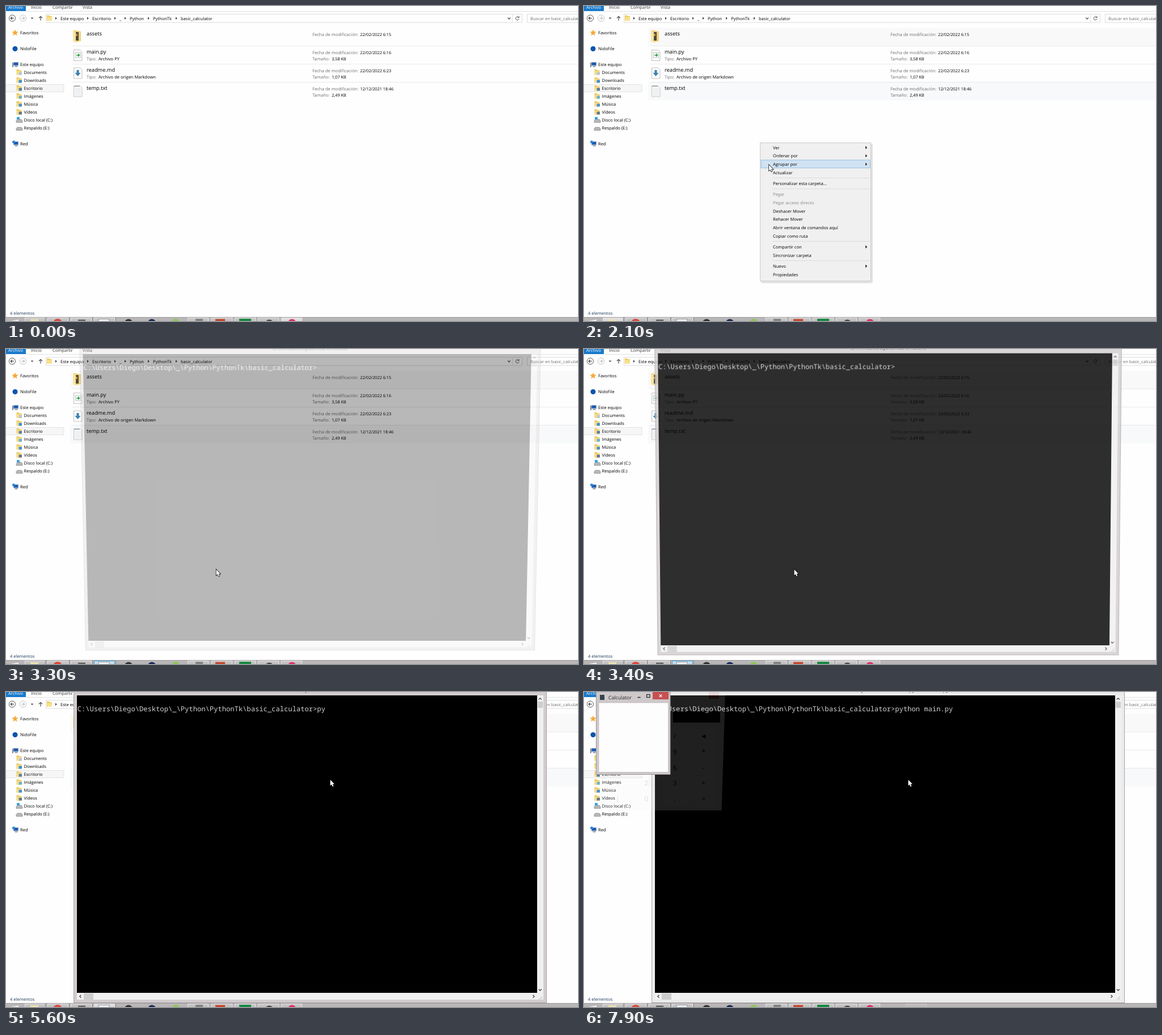
Recreate the animation shown at these times as an HTML page. Size 1008x556 px, loop 8 s.

```html
<!DOCTYPE html>
<html lang="es">
<head>
<meta charset="utf-8">
<title>Console demo</title>
<style>
html, body { margin: 0; width: 100%; height: 100%; overflow: hidden; background: #fefefe; }
svg { position: absolute; left: 0; top: 0; width: 1008px; height: 556px; overflow: visible; }
text { font-family: "Open Sans", sans-serif; white-space: pre; text-rendering: geometricPrecision; }
.mono { font-family: "Noto Sans Mono", monospace; }
#cmd { transform-origin: 535px 82px; }
</style>
</head>
<body>
<svg id="desk"></svg>
<svg id="cmd"></svg>
<svg id="top"></svg>
<script>
const $ = id => document.getElementById(id);
const rect = (x, y, w, h, fill, more = '') => `<rect x="${x}" y="${y}" width="${w}" height="${h}" fill="${fill}" ${more}/>`;
const text = (x, y, s, fill = '#000', size = 7.55, more = '') =>
  `<text x="${x}" y="${y}" fill="${fill}" font-size="${size}" ${more}>${s}</text>`;
const shape = (d, fill, more = '') => `<path d="${d}" fill="${fill}" ${more}/>`;
const line = (d, color, w = 1) => `<path d="${d}" fill="none" stroke="${color}" stroke-width="${w}"/>`;
const disc = (x, y, r, fill, more = '') => `<circle cx="${x}" cy="${y}" r="${r}" fill="${fill}" ${more}/>`;
const group = (id, body) => `<g id="${id}">${body}</g>`;
const show = (id, on) => $(id).setAttribute('opacity', +on);

const folder = (x, y, mark) => shape(`M${x} ${y}h4l1 1.5h4v8h-9z`, '#edcb62') +
  rect(x + 1, y + 3, 8, 6.5, '#f9e08c') + (mark ? rect(x + 4, y + 4.5, 5.5, 5, mark) : '');
const page = y => shape(`M119.5 ${y}h11l3.5 3.5v15.5h-14.5z`, '#fbfbfb', 'stroke="#b4b4b4" stroke-width=".8"');
const screen = (x, y) => rect(x, y, 9, 6.5, '#8fa3b5') + rect(x + 1, y + 1, 7, 4.5, '#1c58b8') +
  rect(x + 2.5, y + 7, 5, 1.5, '#7b8794');

function explorer() {
  let s = rect(0, 0, 1008, 556, '#fefefe');
  s += rect(0, 0, 35, 9, '#1979ca') + line('M35 9.5H1008', '#e0e2e4');
  s += text(4, 5, 'Archivo', '#fff');
  [[44, 'Inicio'], [82, 'Compartir'], [135, 'Vista']].forEach(([x, n]) => s += text(x, 5, n, '#333'));

  // address bar
  s += disc(11, 21.5, 5.6, '#fff', 'stroke="#555"') + line('M14 21.5H8.3M10.8 19L8.3 21.5L10.8 24', '#444', 1.2);
  s += disc(30, 21.5, 5.6, '#fff', 'stroke="#c4c4c4"') + line('M27 21.5H32.7M30.2 19L32.7 21.5L30.2 24', '#c0c0c0', 1.2);
  s += shape('M43.5 20.5h5l-2.5 2.8z', '#555') + line('M61 25.5V18.5M58 21.3L61 18.3L64 21.3', '#555', 1.3);
  s += rect(70.5, 14.5, 839, 14.5, '#fff', 'stroke="#dcdcdc"') + folder(72, 16.5);
  [[96, 'Este equipo'], [152, 'Escritorio'], [200, '_'], [218, 'Python'], [259, 'PythonTk'], [308, 'basic_calculator']]
    .forEach(([x, n]) => s += shape(`M${x - 9} 19.3l2.7 2.4l-2.7 2.4z`, '#333') + text(x, 24.5, n));
  s += line('M884.3 20.5l2.3 2.5l2.3 -2.5', '#555', 1.2) + line('M892.5 15V29', '#e4e4e4');
  s += line('M903.5 19.8A3 3 0 1 0 904.2 22.5M904 18v2.5h-2.5', '#555');
  s += rect(918.5, 14.5, 100, 14.5, '#fff', 'stroke="#dcdcdc"') + text(924, 24.5, 'Buscar en basic_calculator', '#6d6d6d');

  // navigation pane
  s += rect(-1, 138.5, 103, 13, '#f6f6f6', 'stroke="#d9d9d9" stroke-dasharray="1 .5"');
  s += shape('M16 41.5l1.6 3.8l4.1 .3l-3.1 2.7l1 4l-3.6 -2.2l-3.6 2.2l1 -4l-3.1 -2.7l4.1 -.3z', '#f5a93b');
  s += disc(16, 75.5, 4.5, '#0b54ae') + screen(13, 99) + rect(11, 100, 2, 8, '#7d8a97');
  s += screen(13, 239) + disc(13.5, 240, 2.5, '#2c86d8');
  [[47, 'Favoritos'], [75, 'NidoFile'], [103, 'Este equipo'], [242.3, 'Red']].forEach(([y, n]) => s += text(25, y + 3.3, n));
  ['Documents', 'Downloads', 'Escritorio', 'Imágenes', 'Música', 'Vídeos', 'Disco local (C:)', 'Respaldo (E:)'].forEach((n, i) => {
    const y = 117 + 14 * i;
    s += text(31.5, y + 3.2, n);
    if (i < 6) s += folder(18.5, y - 5, ['#b9c7d4', '#3b8fd4', '#5a7fa5', '#6fb1c9', '#4a90d0', '#66778c'][i]);
    else s += shape(`M20 ${y - 1}h7l2 2.5v3h-11v-3z`, '#b5b8bb', 'stroke="#777" stroke-width=".6"');
  });
  s += rect(19, 196, 5, 4, '#33a3e0');

  // file list
  s += rect(113, 38.5, 895, 32, '#f9f9f9', 'id="hover1"') + rect(113, 134.5, 895, 32, '#f8f9fa', 'id="hover2"');
  [70.5, 102.5, 134.5].forEach(y => s += line(`M117 ${y}H1008`, '#e9e9e9'));
  s += shape('M118 43h5l9 2v17l-9 2l-5 -2z', '#f0d27a') + rect(122, 46, 6, 15, '#4b4a45') +
    rect(123, 49, 3, 4, '#c89b3c') + shape('M118 43l5 3v18l-5 -2z', '#fae49c');
  s += page(77.5) + rect(122.5, 82.5, 9, 8.5, '#fff', 'stroke="#9bb59b" stroke-width=".7"') +
    line('M124 86.7h5M127 84.3l2.5 2.4l-2.5 2.4', '#2c9a45', 1.5);
  s += page(109) + shape('M124.5 113h4v5h3l-5 6l-5 -6h3z', '#3b82ae');
  s += page(141);
  for (let y = 145.5; y < 159; y += 2) s += line(`M121 ${y}h11`, '#dce1e6', .8);
  s += line('M120 141.5h10', '#8d9aa5', 1.5);
  [['assets', '', '22/02/2022 6:15', ''], ['main.py', 'Archivo PY', '22/02/2022 6:16', '3,58 KB'],
   ['readme.md', 'Archivo de origen Markdown', '22/02/2022 6:23', '1,07 KB'], ['temp.txt', '', '12/12/2021 18:46', '2,49 KB']]
    .forEach(([name, type, date, size], i) => {
      const y = 53 + 32 * i, grey = '#6d6d6d';
      s += text(142, y - .7, name, '#000', 9.25);
      if (type) s += text(142, y + 11.2, 'Tipo:', grey) + text(163, y + 11.2, type);
      s += text(540, y, 'Fecha de modificación:', grey, 7.6) + text(624, y, date, '#000', 7.28);
      if (size) s += text(540, y + 11.3, 'Tamaño:', grey) + text(574, y + 11.3, size, '#000', 7.3);
    });
  s += text(7, 544.7, '4 elementos', '#1e395b');

  // taskbar
  s += rect(0, 549, 1008, 7, '#b9b6b7') + line('M0 549.5H1008', '#9f9c9d');
  s += shape('M8 556L22 553.5V556z', '#f4f4f4');
  [33, 73, 114, 155, 320, 362, 403, 444, 485, 567].forEach(x =>
    s += rect(x + .5, 550.5, 36, 9, '#c6c3c4', `id="task${x}" stroke="#e6e4e4"`));
  [69, 111, 152, 193].forEach(x => s += line(`M${x}.5 550V556`, '#8f8c8d'));
  s += rect(43, 553, 14, 4, '#eee3b4') + disc(91, 560, 8, '#dd4b3e') + rect(127, 553.5, 13, 4, '#666') +
    rect(163, 552.5, 19, 4, '#eef1f3', 'stroke="#777" stroke-width=".7"') + disc(216, 560, 7.5, '#333') +
    disc(257, 560, 7.5, '#1d2c58') + disc(299, 559, 7, '#8fc65a') + rect(334, 552, 13, 5, '#858585') +
    rect(369, 552.5, 17, 4, '#c7492f') + rect(411, 552, 21, 5, '#188a44') + disc(464, 561, 7.5, '#4b4b4b') +
    disc(504, 560, 7.5, '#e0336b');
  return s;
}

function consoleWindow() {
  const arrow = d => line(d, '#444', 1.3);
  return rect(119.5, -20, 833, 568.5, '#d2cccf', 'id="frame" stroke="#aaa4a7"') +
    text(536, -.8, '', '#222', 9.3, 'id="caption" text-anchor="middle"') +
    rect(125, 6, 822, 537, '#f0f0f0') + rect(125, 6, 811, 525, '#000') +
    rect(937, 17, 9, 11, '#cdcdcd') + rect(137, 532, 17, 11, '#cdcdcd') +
    arrow('M938.8 13.3l2.5 -2.5l2.5 2.5') + arrow('M938.8 524.5l2.5 2.5l2.5 -2.5') +
    arrow('M132.3 534.7l-2.5 2.5l2.5 2.5') + arrow('M928.5 534.7l2.5 2.5l-2.5 2.5') +
    line('M939 543l6 -6M942 543l3 -3', '#bbb') +
    text(125.7, 34.2, '', '#d0d0d0', 12.15, 'id="prompt" class="mono"') +
    rect(0, 35, 7, 2, '#d0d0d0', 'id="caret"');
}

const ROW = 14.65, rows = [];
const chosen = 'Abrir ventana de comandos aquí';
function menu() {
  const panel = rect(312, 243, 197, 246.5, '#000', 'rx="3" opacity=".1"') +
    rect(310.5, 241.5, 195, 244, '#f0f0f0', 'stroke="#b8b8b8" stroke-width=".7"');
  let labels = '', y = 242.6;
  ['Ver>', 'Ordenar por>', 'Agrupar por>', 'Actualizar', '-', 'Personalizar esta carpeta...', '-', 'Pegar',
   'Pegar acceso directo', 'Deshacer Mover', 'Rehacer Mover', chosen, 'Copiar como ruta', '-', 'Compartir con>',
   'Sincronizar carpeta', '-', 'Nuevo>', 'Propiedades'].forEach(n => {
    if (n === '-') {
      labels += line(`M332 ${y + 2.3}H504`, '#d7d7d7', .8);
      y += 4.7;
      return;
    }
    rows.push(y);
    if (n !== chosen) labels += text(333, y + 10, n.replace('>', ''), n.startsWith('Pegar') ? '#888' : '#000');
    if (n.endsWith('>')) labels += shape(`M496 ${y + 4.5}l3 2.8l-3 2.8z`, '#222');
    y += ROW;
  });
  return group('panel', panel) + rect(312, 0, 192, 14, '#d1e2f2', 'id="pick" stroke="#84b9e0" stroke-width=".8"') +
    group('labels', labels) + text(333, 393.8, chosen, '#000', 7.55, 'id="chosen"');
}

function calculator() {
  let big = shape('M22 0H249L242.5 209H29z', '#f0f0f0') + rect(157, 33, 83, 21, '#000') + rect(220, 0, 18, 12, '#c75050');
  ['  /◄', '789*', '456-', '123+', '|0.='].forEach((keys, r) => [...keys].forEach((k, c) => {
    const x = 59 + 50.6 * c, y = 78 + 27.8 * r;
    big += rect(x - 23, y - 12.5, 47, 25, '#fff', 'opacity=".35"') +
      text(x, y + 4, k, '#000', 12, 'text-anchor="middle"');
  }));
  const small = rect(21.5, -2, 130.5, 147.5, '#cec8ca', 'stroke="#9a9597"') +
    rect(26, 19, 122.5, 122.5, '#fdfdfd', 'stroke="#b5b0b2" stroke-width=".6"') +
    rect(28, 5, 8, 9, '#34434d') + text(43, 12.7, 'Calculator', '#222', 8.7) +
    line('M94.5 9.5h5', '#222', 1.5) + rect(110.5, 4.5, 5.5, 5, 'none', 'stroke="#222" stroke-width="1.2"') +
    rect(121, 0, 28, 13, '#c75050') + line('M132.7 4.5l4.6 4.6m0 -4.6l-4.6 4.6', '#fff', 1.2);
  return group('big', big) + group('small', small);
}

$('desk').innerHTML = explorer();
$('cmd').innerHTML = consoleWindow();
$('top').innerHTML = group('menu', menu()) + calculator() +
  shape('M0 0V10.3L2.4 8.2L4 11.9L5.7 11.2L4.1 7.5H7.3z', '#fff', 'id="pointer" stroke="#000" stroke-width="1.4" paint-order="stroke"');

// pointer path: time, x, y
const path = [[200, 890, 75], [300, 622, 156], [400, 456, 207], [500, 366, 234], [600, 346, 241], [700, 298, 284],
  [800, 282.5, 289], [900, 282.5, 289], [1000, 296, 264], [1100, 310, 241], [1900, 310, 241], [2600, 366, 379],
  [2700, 366, 379], [2800, 370.5, 389.3], [3500, 370.5, 389.3], [4000, 473, 271], [4400, 571.5, 155]];
function pointerAt(t) {
  const i = path.findIndex(p => p[0] > t);
  if (i < 1) return path[i < 0 ? path.length - 1 : 0].slice(1);
  const [a, b] = [path[i - 1], path[i]], k = (t - a[0]) / (b[0] - a[0]);
  return [a[1] + (b[1] - a[1]) * k, a[2] + (b[2] - a[2]) * k];
}

const prompt = String.raw`C:\Users\Diego\Desktop\_\Python\PythonTk\basic_calculator>`;
const command = 'python main.py';
// time of each typing step and the length reached
const typing = [[0, 0], [5300, 1], [5600, 2], [5700, 3], [5800, 4], [6100, 5], [6300, 6], [6600, 7],
  [6900, 9], [7000, 11], [7100, 12], [7200, 14]];
const caretOn = [[4200, 4700], [5200, 5300], [6100, 6300], [6600, 6900]];
const within = (t, a, b) => t >= a && t < b;

function draw(t) {
  const [px, py] = pointerAt(t);
  $('pointer').setAttribute('transform', `translate(${px} ${py})`);
  show('pointer', t >= 200);
  show('hover1', t >= 200);
  show('hover2', t >= 300);

  // context menu: fades in, then only the chosen row lingers
  const closing = t >= 3200;
  show('menu', within(t, 1500, 3300) ? Math.min(1, (t - 1400) / 300) : 0);
  show('panel', closing ? .5 : 1);
  show('labels', !closing);
  show('chosen', closing ? .6 : 1);
  const over = rows.find(y => py >= y && py < y + ROW);
  show('pick', over && t >= 2000 ? (closing ? .6 : 1) : 0);
  $('pick').setAttribute('y', over || 0);

  // console swings in
  const k = Math.max(0, (3500 - t) / 100), cmd = $('cmd');
  cmd.style.opacity = t < 3300 ? 0 : 1 - .18 * k * k;
  cmd.style.transform = k ?
    `perspective(1000px) translateY(${k}px) rotateX(${-1.4 * k}deg) scale(${1 - .0145 * k},${1 - .009 * k})` : 'none';
  const n = typing.filter(s => s[0] <= t).pop()[1], running = t >= 7800;
  $('prompt').textContent = prompt + command.slice(0, n);
  $('caret').setAttribute('x', 549 + 7.29 * n);
  show('caret', caretOn.some(([a, b]) => within(t, a, b)));
  $('caption').textContent = String.raw`C:\Windows\system32\cmd.exe` + (running ? ' - python  main.py' : '');
  $('frame').setAttribute('fill', running ? '#ebebeb' : '#d2cccf');

  show('small', running);
  show('big', t >= 7900 ? .13 : 0);

  const active = t < 1600 ? 485 : t < 3300 ? 33 : running ? 567 : 155;
  [33, 155, 485].forEach(x => $('task' + x).setAttribute('fill', x === active ? '#dedcdd' : '#c6c3c4'));
  const fresh = within(t, 3300, 3600);
  $('task155').setAttribute('stroke', fresh ? '#4aa3d8' : '#e6e4e4');
  if (fresh) $('task155').setAttribute('fill', '#c3dceb');
  show('task567', running ? .4 : 0);
}

const start = performance.now();
function tick() {
  draw(Math.floor((performance.now() - start) % 8000 / 100) * 100);
  requestAnimationFrame(tick);
}
tick();
</script>
</body>
</html>
```
